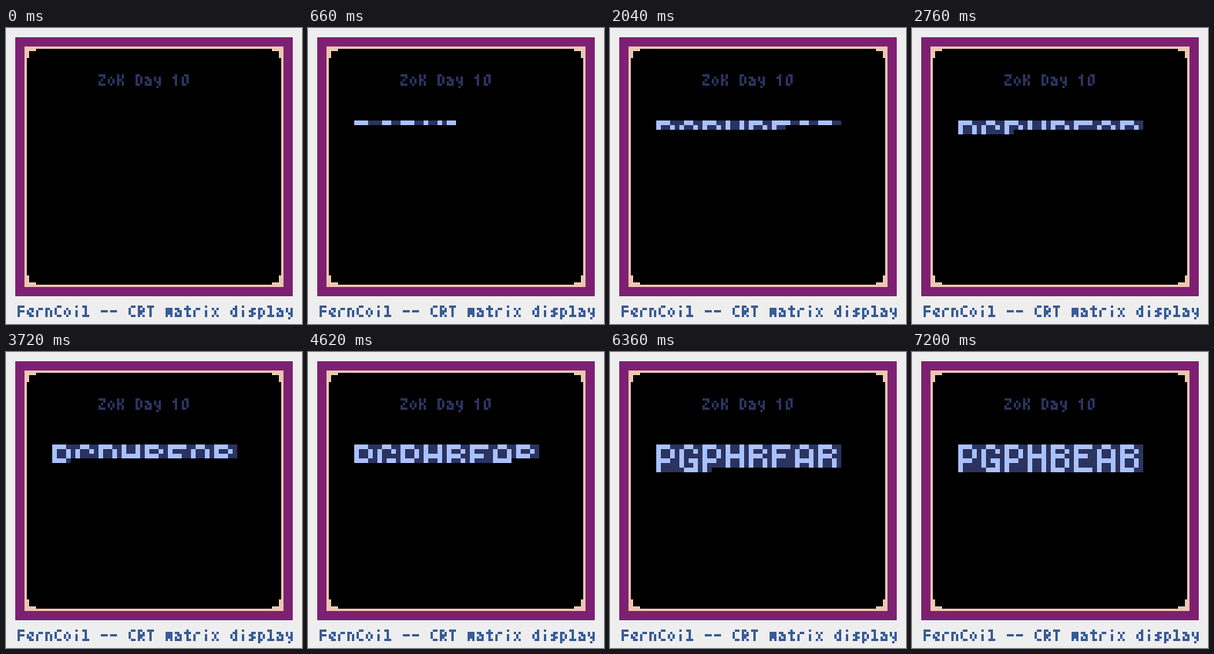
These frames come from a looping animation (384x384 px, 8000 ms). An HTML page with a canvas:

```html
<!DOCTYPE html>
<html lang="en">
<head>
<meta charset="utf-8">
<title>CRT matrix display</title>
<style>
  html, body { margin: 0; width: 100%; height: 100%; overflow: hidden; background: #eee; }
  canvas { display: block; width: 100vw; height: 100vh; image-rendering: pixelated; }
</style>
</head>
<body>
<canvas id="screen" width="384" height="384" role="img"
  aria-label="ZoK Day 10. FernCoil -- CRT matrix display"></canvas>
<script>
const ctx = document.getElementById('screen').getContext('2d');
const UNIT = 3, LOOP = 8000, STEP = 30, COLS = 40, ROWS = 6;
const NAVY = '#2b335f', PURPLE = '#7e2072', BLUE = '#395c98',
      LIT = '#a9c1ff', PAPER = '#eeeeee', PEACH = '#edc7b0';

// Small font: six rows per glyph, one hex digit per row
const FONT = {
  Z: 'e248e0', K: 'aacaa0', D: 'caaac0', F: 'e8e880', C: '688860',
  R: 'caeca0', T: 'e44440', a: '0c6ae0', d: '26aa60', e: '06ac60',
  i: '404440', l: 'c444e0', m: '0eeea0', n: '0caaa0', o: '04aa40',
  p: '0caac8', r: '068880', s: '06c6c0', t: '4e4460', x: '0a44a0',
  y: '0aa624', 0: '6aaac0', 1: '4c4440', '-': '00e000', ' ': '000000'
};

// Large letters shown by the matrix, four cells wide plus a gap
const BIG = {
  P: 'e99e88', G: '698b97', H: '99f999', B: 'e9e99e', E: 'f8e88f', A: '699f99'
};
const WORD = 'PGPHBEAB';

const bit = (glyph, x, y) => x < 4 && (parseInt(glyph[y], 16) >> (3 - x)) & 1;

function box(x, y, w, h, color) {
  ctx.fillStyle = color;
  ctx.fillRect(x * UNIT, y * UNIT, w * UNIT, h * UNIT);
}

function write(text, left, top, color) {
  [...text].forEach((ch, i) => {
    for (let y = 0; y < 6; y++)
      for (let x = 0; x < 4; x++)
        if (bit(FONT[ch], x, y)) box(left + i * 4 + x, top + y, 1, 1, color);
  });
}

function drawCase() {
  box(0, 0, 128, 128, PAPER);
  box(4, 4, 120, 112, PURPLE);
  box(8, 8, 112, 104, PEACH);
  box(9, 9, 110, 102, '#000');
  for (const right of [0, 1])
    for (const low of [0, 1]) {
      box(right ? 115 : 9, low ? 110 : 9, 4, 1, PEACH);
      box(right ? 118 : 9, low ? 107 : 9, 1, 4, PEACH);
    }
  write('ZoK Day 10', 40, 20, NAVY);
  write('FernCoil -- CRT matrix display', 5, 120, BLUE);
}

function drawMatrix(count) {
  for (let i = 0; i < count; i++) {
    const x = i % COLS, y = Math.floor(i / COLS);
    const on = bit(BIG[WORD[Math.floor(x / 5)]], x % 5, y);
    box(20 + x * 2, 40 + y * 2, 2, 2, on ? LIT : NAVY);
  }
}

const start = performance.now();

function frame() {
  const t = (performance.now() - start) % LOOP;
  drawCase();
  drawMatrix(Math.min(Math.floor(t / STEP), COLS * ROWS));
  requestAnimationFrame(frame);
}
frame();
</script>
</body>
</html>
```
